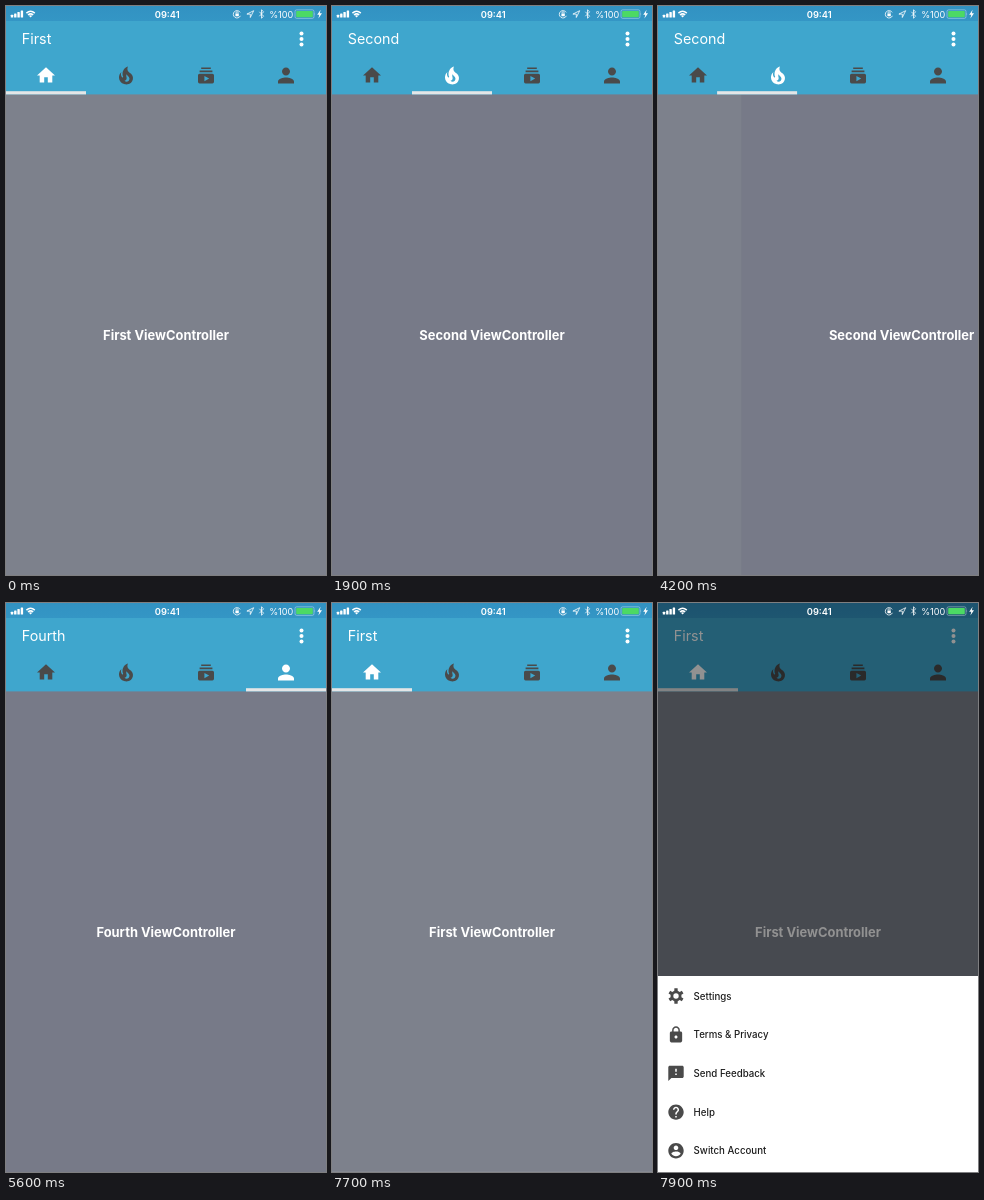
An HTML page that plays this animation: 320 px wide and 569 px high, repeating every 8000 ms.

```html
<!DOCTYPE html>
<html lang="en">
<head>
<meta charset="utf-8">
<title>Tab pager</title>
<style>
  html, body { margin: 0; width: 100%; height: 100%; overflow: hidden; background: #777a88; }
  svg { display: block; width: 100vw; height: 100vh; }
  text { font-family: Inter, Roboto, "Liberation Sans", sans-serif; }
  .label { font-size: 12.9px; font-weight: 700; fill: #fff; text-anchor: middle; }
  .item { font-size: 9.7px; font-weight: 500; fill: #1c1c1c; }
</style>
</head>
<body>
<svg viewBox="0 0 320 569" xmlns="http://www.w3.org/2000/svg">
  <defs>
    <linearGradient id="bar" x1="0" y1="0" x2="0" y2="1">
      <stop offset="0" stop-color="#3292c2"/>
      <stop offset="1" stop-color="#3496c5"/>
    </linearGradient>
  </defs>
  <g id="pages"></g>
  <rect width="320" height="88.4" fill="#3fa6cd"/>
  <rect width="320" height="15" fill="url(#bar)"/>
  <text id="title" x="15.8" y="38.2" font-size="14.3" font-weight="400" fill="#fff"></text>
  <g fill="#fff">
    <circle cx="295.5" cy="27.6" r="2"/>
    <circle cx="295.5" cy="33" r="2"/>
    <circle cx="295.5" cy="38.4" r="2"/>
  </g>
  <g id="tabs"></g>
  <rect id="line" y="85.2" width="80" height="3.2" fill="#e4e6e7"/>
  <rect id="shade" width="320" height="569" opacity="0"/>

  <!-- status bar -->
  <g fill="#fff">
    <rect x="4.8" y="8.8" width="2.4" height="2.8" rx=".4"/>
    <rect x="8.1" y="7.5" width="2.4" height="4.1" rx=".4"/>
    <rect x="11.4" y="6.1" width="2.4" height="5.5" rx=".4"/>
    <rect x="14.7" y="4.5" width="2.4" height="7.1" rx=".4"/>
    <path d="M24.6 11.6l-1.7-1.8q1.7-1.3 3.4 0z"/>
    <text x="161.2" y="11.6" font-size="9.3" font-weight="600" text-anchor="middle">09:41</text>
    <text x="263.2" y="11.5" font-size="9.1">%100</text>
    <path d="M240.9 8.1l6.8-3.4-3.4 6.8V8.1z" fill="none" stroke="#fff" stroke-width=".8"/>
    <rect x="229.4" y="7.5" width="3.4" height="2.7" rx=".3"/>
    <rect x="290.2" y="5" width="16.6" height="6.2" rx=".8" fill="#4cd964"/>
    <path d="M308.6 6.6q1.3 1.5 0 3z" opacity=".5"/>
    <path d="M314.6 3.8l-3.4 4.9h2.1l-.9 3.8 3.6-5.2h-2.2z"/>
  </g>
  <g fill="none" stroke="#fff">
    <path d="M20.4 7.1q4.2-3.8 8.4 0M22 9q2.6-2.2 5.2 0" stroke-width="1.5"/>
    <path d="M234.2 6.4a3.7 3.7 0 1 0 .2 3.4M230.1 7.5v-.8a1 1 0 0 1 2 0v.8" stroke-width=".8"/>
    <path d="M253.4 5.8l4.2 4.4-2.1 2V3.8l2.1 2-4.2 4.4" stroke-width=".8"/>
    <rect x="289" y="3.8" width="19" height="8.6" rx="1.7" stroke-width=".7" opacity=".5"/>
  </g>
  <g id="sheet">
    <rect width="320" height="210" fill="#fff"/>
  </g>
</svg>
<script>
const LOOP = 8000, STEP = 100, W = 320, H = 569;
const SHEET_H = 196, ROW_H = 38.7, SHADE = 0.43;
const $ = id => document.getElementById(id);

function add(parent, tag, attrs, text) {
  const el = document.createElementNS("http://www.w3.org/2000/svg", tag);
  for (const k in attrs) el.setAttribute(k, attrs[k]);
  if (text) el.textContent = text;
  return parent.appendChild(el);
}

// Icons are drawn on a 24-unit grid and placed by their centre.
function icon(parent, d, x, y, scale) {
  return add(parent, "path", {
    d, fill: "#4a4a4a", "fill-rule": "evenodd",
    transform: `translate(${x} ${y}) scale(${scale}) translate(-12 -12)`
  });
}

function gear() {
  const pts = [];
  for (let i = 0; i < 6; i++) {
    for (const [a, r] of [[-18, 7.2], [-12, 10.2], [12, 10.2], [18, 7.2]]) {
      const th = (i * 60 + 30 + a + 60) * Math.PI / 180;
      pts.push((12 + r * Math.cos(th)).toFixed(2) + " " + (12 + r * Math.sin(th)).toFixed(2));
    }
  }
  return "M" + pts.join("L") + "zM8.5 12a3.5 3.5 0 1 0 7 0a3.5 3.5 0 1 0-7 0z";
}

const DISC = "M12 2C6.48 2 2 6.48 2 12s4.48 10 10 10 10-4.48 10-10S17.52 2 12 2z";

const tabs = [
  { name: "First", scale: 0.9, d: "M10 20v-6h4v6h5v-8h3L12 3 2 12h3v8z" },
  { name: "Second", scale: 1, d: "M17.66 11.2C17 10.3 15.8 9.7 14.82 8.72 13.33 7.26 13 4.85 13.95 3 13 3.23 12.17 3.75 11.46 4.32 8.87 6.4 7.85 10.07 9.07 13.22 9.4 13.95 8.6 14.4 8 13.76 6.87 12.33 6.69 10.28 7.45 8.64 5.78 10 4.87 12.3 5 14.47 5.1 15.7 5.4 16.7 6 17.7 7.08 19.43 8.95 20.67 10.96 20.92 13.1 21.19 15.39 20.8 17.03 19.32 18.86 17.66 19.5 15 18.56 12.72Q18.2 11.9 17.66 11.2zM14.5 17.5C13.2 18.6 11.6 18.4 10.5 17.28 11.69 17 12.4 16.12 12.61 15.23 12.78 14.43 12.46 13.77 12.33 13 12.21 12.26 12.23 11.63 12.5 10.94 13.3 12.7 15.1 13.2 15.4 14.8 15.6 15.9 15.1 16.95 14.5 17.5z" },
  { name: "Thirth", scale: 0.8, d: "M20 8H4V6h16v2zm-2-6H6v2h12V2zm4 10v8c0 1.1-.9 2-2 2H4c-1.1 0-2-.9-2-2v-8c0-1.1.9-2 2-2h16c1.1 0 2 .9 2 2zm-6 4l-6-3.27v6.53L16 16z" },
  { name: "Fourth", scale: 1, d: "M12 12c2.21 0 4-1.79 4-4s-1.79-4-4-4-4 1.79-4 4 1.79 4 4 4zm0 2c-2.67 0-8 1.34-8 4v2h16v-2c0-2.66-5.33-4-8-4z" }
];

const menu = [
  ["Settings", gear()],
  ["Terms & Privacy", "M18 8h-1V6c0-2.76-2.24-5-5-5S7 3.24 7 6v2H6c-1.1 0-2 .9-2 2v10c0 1.1.9 2 2 2h12c1.1 0 2-.9 2-2V10c0-1.1-.9-2-2-2zm-6 9c-1.1 0-2-.9-2-2s.9-2 2-2 2 .9 2 2-.9 2-2 2zm3.1-9H8.9V6c0-1.71 1.39-3.1 3.1-3.1 1.71 0 3.1 1.39 3.1 3.1v2z"],
  ["Send Feedback", "M20 2H4c-1.1 0-2 .9-2 2v18l4-4h14c1.1 0 2-.9 2-2V4c0-1.1-.9-2-2-2zm-7 12h-2v-2h2v2zm0-4h-2V6h2v4z"],
  ["Help", DISC + "m1 17h-2v-2h2v2zm2.07-7.75l-.9.92C13.45 12.9 13 13.5 13 15h-2v-.5c0-1.1.45-2.1 1.17-2.83l1.24-1.26c.37-.36.59-.86.59-1.41 0-1.1-.9-2-2-2s-2 .9-2 2H8c0-2.21 1.79-4 4-4s4 1.79 4 4c0 .88-.36 1.68-.93 2.25z"],
  ["Switch Account", DISC + "m0 3c1.66 0 3 1.34 3 3s-1.34 3-3 3-3-1.34-3-3 1.34-3 3-3zm0 14.2c-2.5 0-4.71-1.28-6-3.22.03-1.99 4-3.08 6-3.08 1.99 0 5.97 1.09 6 3.08-1.29 1.94-3.5 3.22-6 3.22z"]
];

// Page changes: start, duration, page to go to.
const moves = [
  [1250, 450, 1], [1950, 400, 2], [2450, 400, 3],
  [2950, 400, 2], [3420, 300, 1], [3720, 260, 0],
  [3980, 450, 1], [4550, 380, 2], [5050, 450, 3],
  [5650, 380, 2], [6050, 380, 1], [6550, 642, 0]
];

tabs.forEach((tab, i) => {
  add($("pages"), "rect", { x: i * W, y: 88, width: W, height: H - 88, fill: i ? "#777a88" : "#7d818c" });
  add($("pages"), "text", { x: i * W + 160, y: 333.7, class: "label" }, tab.name + " ViewController");
  tab.el = icon($("tabs"), tab.d, 40 + i * 80, 69.4, tab.scale);
});

menu.forEach(([name, d], i) => {
  const y = 20 + i * ROW_H;
  icon($("sheet"), d, 18, y, 0.77);
  add($("sheet"), "text", { x: 35.6, y: y + 3.5, class: "item" }, name);
});

const unit = x => Math.min(1, Math.max(0, x));
const easeOut = u => 1 - (1 - u) ** 2;
const smooth = u => u * u * (3 - 2 * u);

function pager(t) {
  let pos = 0, page = 0;
  for (const [start, dur, to] of moves) {
    if (t < start) break;
    const p = easeOut(unit((t - start) / dur));
    pos = page + (to - page) * p;
    if (p < 0.3) return { pos, page };
    if (p < 1) return { pos, page: to };
    page = to;
  }
  return { pos, page };
}

function draw(t) {
  const { pos, page } = pager(t);
  $("pages").setAttribute("transform", `translate(${-pos * W} 0)`);
  $("line").setAttribute("x", pos * 80);
  $("title").textContent = tabs[page].name;
  tabs.forEach((tab, i) => tab.el.setAttribute("fill", i === page ? "#fff" : "#4a4a4a"));

  const open = smooth(unit((t - 7698) / 202));
  $("shade").setAttribute("opacity", SHADE * open);
  $("sheet").setAttribute("transform", `translate(0 ${H - SHEET_H * open})`);
}

// The screen refreshes ten times a second.
const begin = performance.now();
function tick() {
  const t = (performance.now() - begin) % LOOP;
  draw(Math.floor(t / STEP) * STEP);
  requestAnimationFrame(tick);
}
draw(0);
requestAnimationFrame(tick);
</script>
</body>
</html>
```
